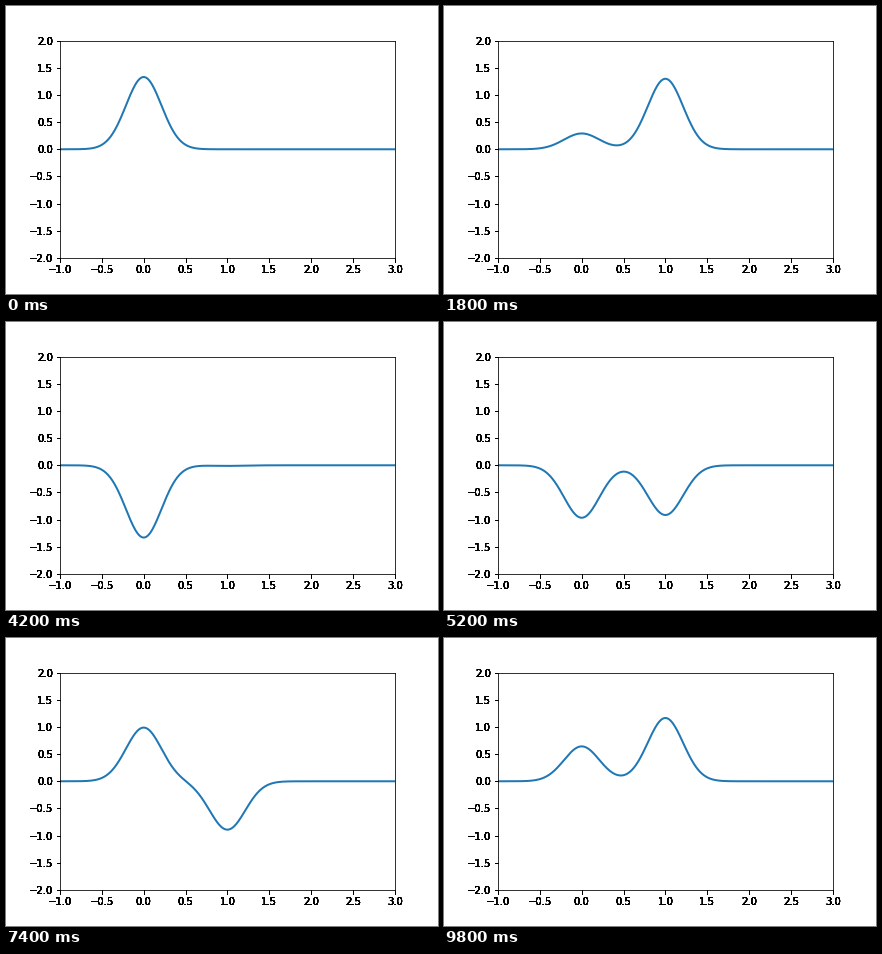
These frames come from a looping animation (432 by 288 pixels, 10 s). A matplotlib script:

```python
import numpy as np
import matplotlib.pyplot as plt
from matplotlib.animation import FuncAnimation
from matplotlib.axes import Axes

FRAMES = 50
INTERVAL = 200      # ms
STEP = 0.15         # phase advance per frame, radians
WIDTH = 0.3
INK_PASSES = 9


class InkAxes(Axes):
    """Axes whose ticks and labels are inked repeatedly for a hard, heavy edge."""

    def draw(self, renderer):
        super().draw(renderer)
        ticks = [t for axis in (self.xaxis, self.yaxis)
                 for t in axis.get_major_ticks()]
        for _ in range(INK_PASSES):
            for tick in ticks:
                tick.draw(renderer)


def bump(x, center):
    return np.exp(-((x - center) / WIDTH) ** 2) / (WIDTH * np.sqrt(2 * np.pi))


plt.rcParams.update({"font.family": "DejaVu Sans", "font.size": 10})
fig = plt.figure(figsize=(6, 4), dpi=72, facecolor="white")
ax = InkAxes(fig, [0.125, 0.125, 0.775, 0.755])
fig.add_axes(ax)
ax.set(xlim=(-1, 3), ylim=(-2, 2),
       xticks=np.arange(-1, 3.1, 0.5), yticks=np.arange(-2, 2.1, 0.5))

x = np.linspace(-1, 3, 500)
left, right = bump(x, 0), bump(x, 1)
line, = ax.plot([], [], color="#1f77b4", lw=2)


def update(i):
    phase = STEP * i
    line.set_data(x, np.cos(phase) * left + np.sin(phase) * right)
    return line,


def init():
    return update(0)


anim = FuncAnimation(fig, update, frames=FRAMES, init_func=init,
                     interval=INTERVAL, repeat=True, repeat_delay=0, blit=False)
plt.show()
```
